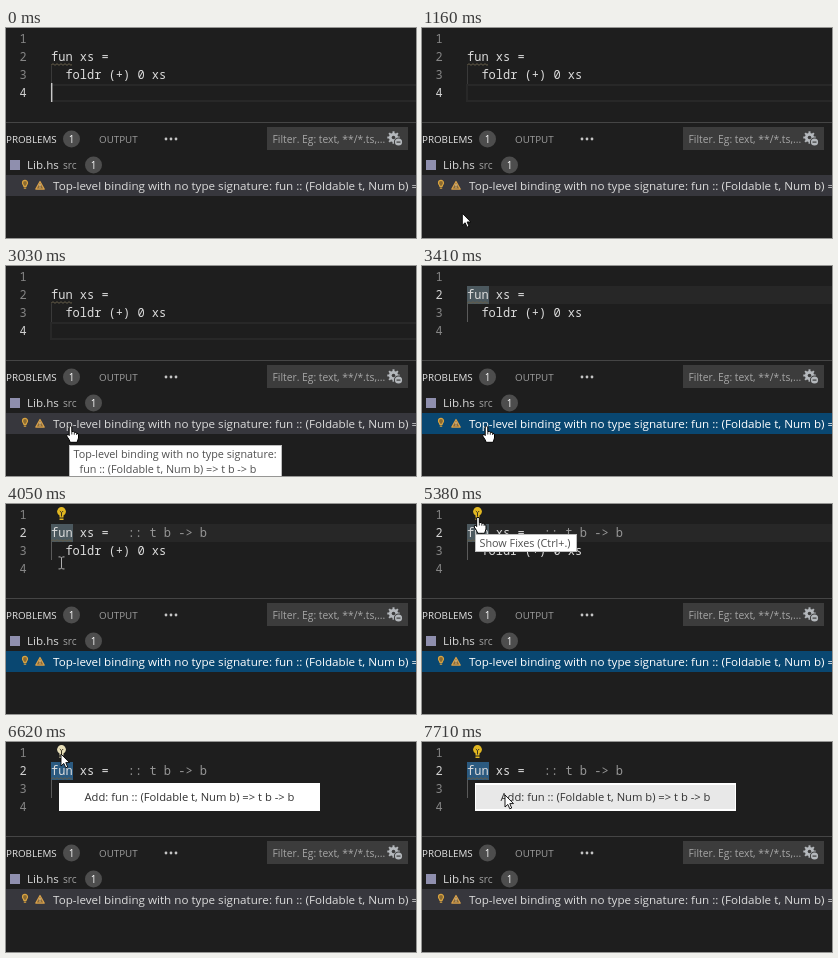
Write an HTML page with a canvas that moves like this. It is 410x210 px and loops after 8000 ms.

```html
<!DOCTYPE html>
<html lang="en">
<head>
<meta charset="utf-8">
<title>Type signature quick fix</title>
<style>
  html, body { margin: 0; width: 100%; height: 100%; overflow: hidden; background: #1e1e1e; }
  canvas { display: block; width: 410px; height: 210px; }
</style>
</head>
<body>
<canvas id="stage" width="410" height="210"></canvas>
<script>
const ctx = document.getElementById('stage').getContext('2d');
const LOOP = 8000;
const MONO = '12px "Noto Sans Mono", monospace';
const ui = size => `${size}px "Open Sans", "Noto Sans", sans-serif`;

const T = {
  tipIn: 1570, tipFull: 1700, select: 3260, lens: 3420, bulb: 3580,
  fixTip: 5230, fixFull: 5380, press: 6010, menu: 6160, arrow: 6240, leave: 7100
};

// Pointer path: time, x, y of the hot spot
const PATH = [
  [850, 9, 211], [1050, 27, 197], [1250, 51, 176], [1430, 64.5, 160],
  [3740, 64.5, 160], [3880, 61, 118], [4050, 55.5, 59], [4250, 56, 42],
  [4610, 56, 19], [4680, 53, 15], [4790, 53, 15], [4850, 54, 12], [5000, 56, 13],
  [6170, 56, 13], [6240, 55, 12], [6780, 55, 12], [6930, 58, 15],
  [7040, 58, 16], [7250, 67, 31], [7450, 77, 45], [7710, 83, 53]
];

function pointerAt(t) {
  if (t < PATH[0][0]) return null;
  for (let i = 1; i < PATH.length; i++) {
    const [t0, x0, y0] = PATH[i - 1], [t1, x1, y1] = PATH[i];
    if (t < t1) {
      const k = (t - t0) / (t1 - t0);
      return { x: x0 + (x1 - x0) * k, y: y0 + (y1 - y0) * k };
    }
  }
  const [, x, y] = PATH[PATH.length - 1];
  return { x, y };
}

const within = (t, a, b) => t >= a && t < b;
const fade = (t, a, b) => Math.max(0, Math.min(1, (t - a) / (b - a)));

function rect(x, y, w, h, color) {
  ctx.fillStyle = color;
  ctx.fillRect(x, y, w, h);
}

function text(str, x, y, font, color, align = 'left') {
  ctx.font = font;
  ctx.fillStyle = color;
  ctx.textAlign = align;
  ctx.fillText(str, x, y);
}

function disc(x, y, r, color) {
  ctx.fillStyle = color;
  ctx.beginPath();
  ctx.arc(x, y, r, 0, Math.PI * 2);
  ctx.fill();
}

function shape(d, x, y, fill, stroke, width = 1) {
  const p = new Path2D(d);
  ctx.save();
  ctx.translate(x, y);
  if (fill) { ctx.fillStyle = fill; ctx.fill(p); }
  if (stroke) { ctx.strokeStyle = stroke; ctx.lineWidth = width; ctx.lineJoin = 'round'; ctx.stroke(p); }
  ctx.restore();
}

function badge(x, y) {
  disc(x, y, 8.5, '#4d4d4d');
  text('1', x, y + 3.5, ui(10), '#fff', 'center');
}

function bulb(x, y, color) {
  disc(x, y - 2, 4.4, color);
  rect(x - 2, y + 1, 4, 3, color);
  rect(x - 2, y + 5, 4, 1.5, color);
  shape('M-1.7-2.5L0-.8L1.7-2.5M0-.8V3', x, y, null, '#3a3320');
}

function editor(t) {
  const picked = t >= T.select;
  if (!picked) {
    ctx.strokeStyle = '#282828';
    ctx.lineWidth = 2;
    ctx.strokeRect(45, 57, 380, 16);
  }
  if (within(t, T.select, T.press)) rect(45, 20, 365, 18, '#272727');
  rect(45, 38, 1, 18, picked ? '#5a5a5a' : '#3a3a3a');
  if (picked) rect(45, 20, 22, 18, t < T.press ? '#4b585e' : '#2b5a80');

  const active = picked ? 2 : 4;
  for (let n = 1; n <= 4; n++) {
    text(n, 17, 18 * n - 3, MONO, n === active ? '#d0d0d0' : '#858585', 'center');
  }
  text('fun xs =', 45, 33, MONO, '#dcdcdc');
  text('foldr (+) 0 xs', 59.4, 51, MONO, '#dcdcdc');
  if (t >= T.lens) text(':: t b -> b', 121.8, 33, MONO, '#969696');

  ctx.strokeStyle = '#655d49';
  ctx.lineWidth = 1;
  ctx.beginPath();
  for (let x = 45; x <= 66; x++) ctx.lineTo(x, 36.5 + 0.8 * Math.sin(x * Math.PI / 2));
  ctx.stroke();

  const blink = t < 70 || within(t, 550, 1050) || within(t, 1550, 2020) || within(t, 2480, 3030);
  if (blink) rect(45, 55, 1.4, 19, '#c8c8c8');
  if (within(t, 6090, 6620) || within(t, 7120, 7620)) rect(67, 20, 1.4, 18, '#aeafad');
  if (t >= T.bulb) bulb(55.5, 9.5, within(t, T.arrow, T.leave) ? '#e8dfb8' : '#e2b821');
}

function gear(x, y) {
  ctx.strokeStyle = '#b4b8bc';
  ctx.lineWidth = 2;
  for (let i = 0; i < 8; i++) {
    const a = i * Math.PI / 4, c = Math.cos(a), s = Math.sin(a);
    ctx.beginPath();
    ctx.moveTo(x + c * 3.5, y + s * 3.5);
    ctx.lineTo(x + c * 6.2, y + s * 6.2);
    ctx.stroke();
  }
  disc(x, y, 4.6, '#b4b8bc');
  disc(x, y, 1.8, '#3c3c3c');
  // excluded-files mark on the lower right
  disc(x + 5, y + 4.5, 4.6, '#3c3c3c');
  disc(x + 5, y + 4.5, 3.6, '#b4b8bc');
  rect(x + 3, y + 4, 4, 1.2, '#3c3c3c');
}

function panel(t) {
  const picked = within(t, T.select, T.press);
  rect(0, 94, 410, 1, '#454545');
  text('PROBLEMS', 0, 114.5, ui(9.8), '#e7e7e7');
  badge(65.5, 111);
  text('OUTPUT', 93, 114.5, ui(9.8), '#a0a0a0');
  for (const x of [160, 165, 170]) disc(x, 111, 1.4, '#c5c5c5');

  rect(261, 99, 141, 23, '#3c3c3c');
  text('Filter. Eg: text, **/*.ts,...', 266.5, 115, ui(10.3), '#a6a6a6');
  gear(387.5, 109.5);

  rect(4, 132, 10, 10, '#8f8fae');
  text('Lib.hs', 21, 141, ui(11.6), '#d8d8d8');
  text('src', 57, 141, ui(10.2), '#a0a0a0');
  badge(87.5, 137);

  rect(0, 147, 410, 21, picked ? '#094771' : '#37373d');
  shape('M-1.2 1.8C-1.2.6-2.5-.2-2.5-1.6A2.5 2.5 0 0 1 2.5-1.6C2.5-.2 1.2.6 1.2 1.8ZM-1.2 3.6H1.2',
    19, 156.5, '#8a6a30', '#d9a441', 1.2);
  shape('M0-4L4.2 3.6H-4.2Z', 34, 157.5, '#8a6a38', '#d8a04a', 1.2);
  shape('M0-1.6V1M0 1.8V2.6', 34, 157.5, null, '#f0d8a8');
  text('Top-level binding with no type signature: fun :: (Foldable t, Num b) => t b -> b',
    47, 162, ui(11.65), picked ? '#fff' : '#dcdcdc');
}

// Grey level blended with the dark page behind it
function grey(level, alpha) {
  const v = Math.round(level * alpha + 30 * (1 - alpha));
  return `rgb(${v},${v},${v})`;
}

function tooltip(x, y, w, h, lines, alpha) {
  rect(x, y, w, h, grey(190, alpha));
  rect(x + 1, y + 1, w - 2, h - 2, grey(255, alpha));
  lines.forEach(([str, dx], i) =>
    text(str, x + 4.5 + dx, y + 13 + i * 14.5, ui(10.8), grey(80, alpha)));
}

function popups(t, p) {
  if (within(t, T.tipIn, T.select)) {
    tooltip(63, 179, 213, 33, [
      ['Top-level binding with no type signature:', 0],
      ['fun :: (Foldable t, Num b) => t b -> b', 6]
    ], 0.55 + 0.45 * fade(t, T.tipIn, T.tipFull));
  }
  if (within(t, T.fixTip, T.press)) {
    tooltip(53, 30, 102, 18, [['Show Fixes (Ctrl+.)', 0]], 0.35 + 0.65 * fade(t, T.fixTip, T.fixFull));
  }
  if (t >= T.menu) {
    rect(53, 41, 261, 28, '#fff');
    if (p.y > 42) rect(54, 43, 259, 24, '#e8e8e8');
    text('Add: fun :: (Foldable t, Num b) => t b -> b', 78.5, 59, ui(11.2), '#333');
  }
}

const ARROW = 'M0 0V12L2.8 9.4L4.8 13.8L6.7 13L4.8 8.6H8.5Z';
const HAND = 'M-1.3 1Q0-.8 1.3 1V5.5L3.2 5.6L4 6.3L5.6 6.3L6.3 7.2Q8 7.2 8 9V12L6.6 16.3H-.3L-1.5 13.5L-3.8 10Q-3.8 7.8-2.2 8.5L-1.3 9.6Z';
const BEAM = 'M-3-6H-1L0-5L1-6H3M0-5V5M-3 6H-1L0 5L1 6H3';

function pointer(t, { x, y }) {
  const onRow = y > 147 && y < 168;
  const onBulb = within(t, 4500, T.arrow);
  if (onRow || onBulb) {
    shape(HAND, x, y, '#fff', '#000');
    shape('M1.3 5.5V8.5M3.8 6.3V8.7M6.1 7V9', x, y, null, '#000', 0.8);
  } else if (y < 91 && t < 4500) {
    shape(BEAM, x, y, null, '#b0b0b0');
  } else {
    shape(ARROW, x, y, '#fff', '#000', 0.9);
  }
}

function draw(t) {
  const p = pointerAt(t);
  rect(0, 0, 410, 210, '#1e1e1e');
  editor(t);
  panel(t);
  popups(t, p);
  if (p) pointer(t, p);
}

const start = performance.now();
function tick(now) {
  draw(Math.max(0, now - start) % LOOP);
  requestAnimationFrame(tick);
}
draw(0);
requestAnimationFrame(tick);
</script>
</body>
</html>
```
